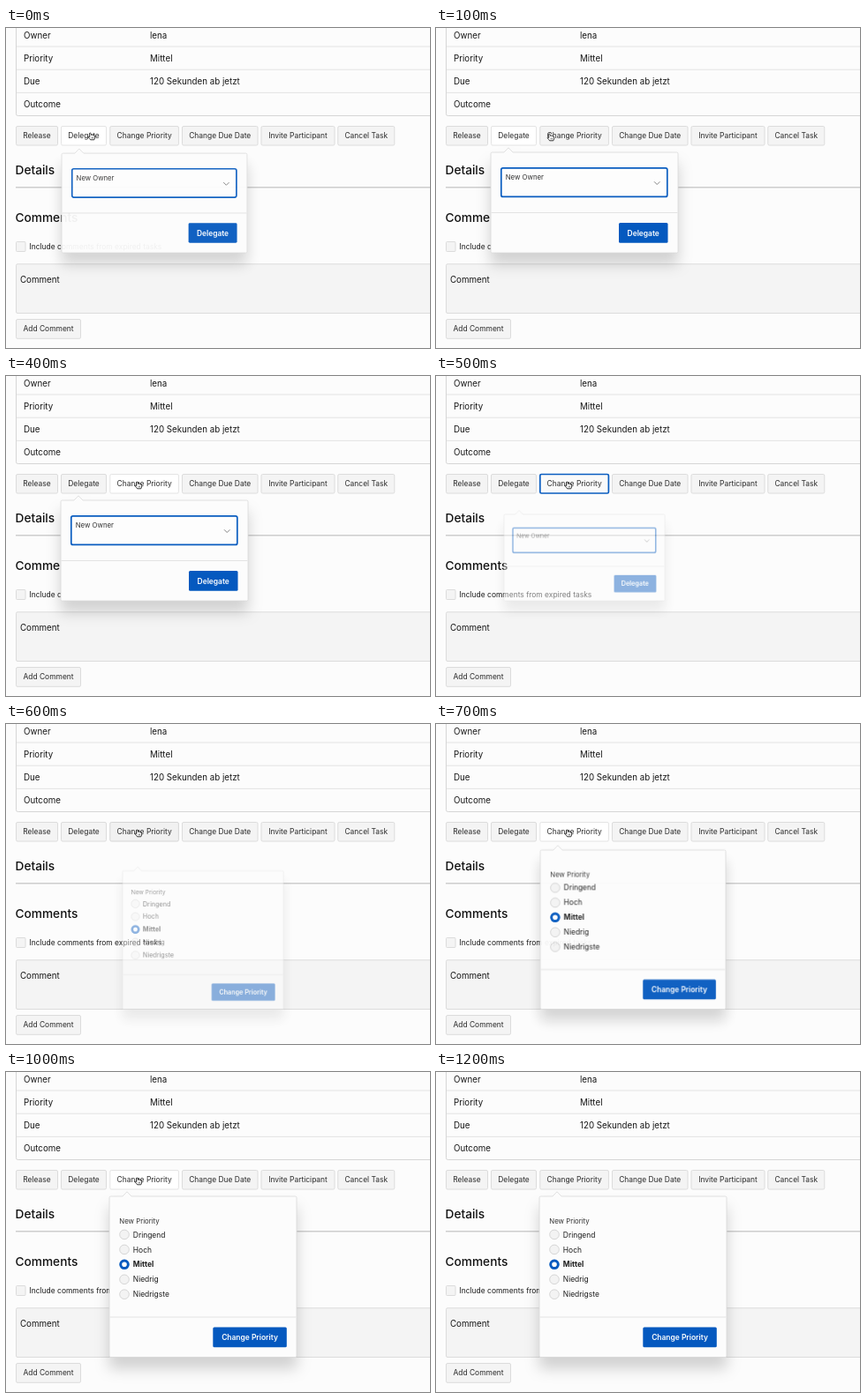
Write an HTML page that moves like this. It is 480 px wide and 363 px high and loops after 1.7 s.

```html
<!DOCTYPE html>
<html lang="de">
<head>
<meta charset="utf-8">
<title>Task actions</title>
<style>
  html, body { margin: 0; width: 100%; height: 100%; overflow: hidden; background: #fcfcfc; }
  svg { display: block; width: 100%; height: 100%; }
  text { font: 400 8.45px Inter, "Open Sans", sans-serif; fill: #1c1c1c; }

  .body text { font-size: 9.75px; fill: #161616; }
  .heading { font-size: 13.7px; font-weight: 500; fill: #111; }
  .small { font-size: 7.8px; fill: #333; }
  .line { stroke: #e3e3e3; }
  .box { fill: #f4f4f4; stroke: #dcdcdc; }
  .btn text { text-anchor: middle; fill: #2b2b2b; }
  .primary rect { fill: #0559bf; }
  .primary text { text-anchor: middle; font-weight: 600; fill: #fff; }
  .strong { font-weight: 700; }

  .panel { fill: #fcfcfc; stroke: #d9d9d9; stroke-width: .8; filter: drop-shadow(0 13px 8px rgba(0, 0, 0, .17)); }
  .field { fill: #fdfdfd; stroke: #0a5dc0; stroke-width: 1.7; }
  .radio { fill: #f3f3f3; stroke: #d6d6d6; }
  .radio.on { fill: #fff; stroke: #0559bf; stroke-width: 3; }

  #owner, #priority, #delegate, #change, #hand { animation: 1.7s step-end infinite; }
  #owner { transform-origin: 168px 255px; animation-name: owner; }
  #priority { transform-origin: 223px 323.5px; animation-name: priority; }
  #delegate { animation-name: delegate; }
  #change { animation-name: change; }
  #hand { animation-name: hand; }

  @keyframes owner {
    0% { opacity: .95; transform: scale(.99); }
    5.88% { opacity: 1; transform: none; }
    29.41% { opacity: .45; transform: scale(.86); }
    35.29%, 100% { opacity: 0; transform: scale(.86); }
  }
  @keyframes priority {
    0% { opacity: 0; transform: scale(.86); }
    35.29% { opacity: .45; transform: scale(.86); }
    41.17% { opacity: .95; transform: scale(.99); }
    47.05%, 100% { opacity: 1; transform: none; }
  }
  @keyframes delegate {
    0% { fill: #fff; stroke: #e4e4e4; }
    11.76%, 100% { fill: #f4f4f4; stroke: #dcdcdc; }
  }
  @keyframes change {
    0% { fill: #f4f4f4; stroke: #dcdcdc; stroke-width: 1; }
    11.76% { fill: #fff; stroke: #e4e4e4; stroke-width: 1; }
    29.41% { fill: #fafafa; stroke: #0a5dc0; stroke-width: 1.7; }
    35.29% { fill: #f1f1f1; stroke: #d6d6d6; stroke-width: 1; }
    41.17% { fill: #fff; stroke: #e4e4e4; stroke-width: 1; }
    70.58%, 100% { fill: #f4f4f4; stroke: #dcdcdc; stroke-width: 1; }
  }
  @keyframes hand {
    0% { transform: translate(97px, 123px); opacity: 1; }
    5.88% { transform: translate(130px, 124px); opacity: 1; }
    11.76% { transform: translate(146px, 124px); opacity: 1; }
    17.64% { transform: translate(150px, 124px); opacity: 1; }
    70.58%, 100% { transform: translate(150px, 124px); opacity: 0; }
  }
</style>
</head>
<body>
<svg viewBox="0 0 480 363" preserveAspectRatio="none">
  <!-- Task table -->
  <path d="M11.5 -2V97.5Q11.5 99.5 13.5 99.5H482" fill="none" stroke="#d6d6d6"/>
  <path class="line" d="M12 21H480M12 47.2H480M12 73.4H480"/>
  <g class="body">
    <text x="20" y="11.5">Owner</text><text x="163" y="11.5">lena</text>
    <text x="20" y="37.7">Priority</text><text x="163" y="37.7">Mittel</text>
    <text x="20" y="63.8">Due</text><text x="163" y="63.8">120 Sekunden ab jetzt</text>
    <text x="20" y="90">Outcome</text>
  </g>

  <!-- Actions -->
  <g class="btn">
    <rect class="box" x="11.5" y="111.5" width="47" height="21.5" rx="1.5"/><text x="35" y="125.3">Release</text>
    <rect class="box" id="delegate" x="62.5" y="111.5" width="51" height="21.5" rx="1.5"/><text x="88" y="125.3">Delegate</text>
    <rect class="box" id="change" x="117.8" y="111.5" width="77.6" height="21.5" rx="1.5"/><text x="156.6" y="125.3">Change Priority</text>
    <rect class="box" x="199.5" y="111.5" width="85.5" height="21.5" rx="1.5"/><text x="242.2" y="125.3">Change Due Date</text>
    <rect class="box" x="289" y="111.5" width="83" height="21.5" rx="1.5"/><text x="330.5" y="125.3">Invite Participant</text>
    <rect class="box" x="375.8" y="111.5" width="64" height="21.5" rx="1.5"/><text x="407.8" y="125.3">Cancel Task</text>
  </g>

  <text class="heading" x="10.5" y="166">Details</text>
  <path d="M11 180.8H480" stroke="#cecece" stroke-width="1.4"/>

  <!-- Comments -->
  <text class="heading" x="10.5" y="220">Comments</text>
  <rect class="box" x="11.5" y="242.5" width="10.5" height="11" rx="1"/>
  <text x="26.5" y="251">Include comments from expired tasks</text>
  <rect class="box" x="11.5" y="267.8" width="480" height="55.7" rx="1.5"/>
  <g class="body"><text x="16" y="288.5">Comment</text></g>
  <g class="btn">
    <rect class="box" x="11.5" y="330.5" width="73" height="21.8" rx="1.5"/><text x="48" y="344.3">Add Comment</text>
  </g>

  <g id="owner">
    <path class="panel" d="M63.5 141H77L82 135.8L87 141H272.5Q274 141 274 142.5V253.5Q274 255 272.5 255H63.5Q62 255 62 253.5V142.5Q62 141 63.5 141Z"/>
    <rect class="field" x="73.8" y="158.8" width="188" height="32.6" rx="2"/>
    <text class="small" x="78.7" y="171.8">New Owner</text>
    <path d="M247 174.3L250.2 177.5L253.4 174.3" fill="none" stroke="#777" stroke-width=".9"/>
    <path class="line" d="M62.5 209.5H273.5"/>
    <g class="primary">
      <rect x="207" y="221" width="55.5" height="22.7" rx="1.5"/><text x="234.7" y="235.5">Delegate</text>
    </g>
  </g>

  <g id="priority">
    <path class="panel" d="M118.5 141H132L137 135.8L142 141H327.5Q329 141 329 142.5V322Q329 323.5 327.5 323.5H118.5Q117 323.5 117 322V142.5Q117 141 118.5 141Z"/>
    <text class="small" x="128.3" y="171.8">New Priority</text>
    <circle class="radio" cx="134" cy="184.4" r="5.3"/><text x="143.8" y="187.5">Dringend</text>
    <circle class="radio" cx="134" cy="201.4" r="5.3"/><text x="143.8" y="204.5">Hoch</text>
    <circle class="radio on" cx="134" cy="218.3" r="4.3"/><text class="strong" x="143.8" y="221.4">Mittel</text>
    <circle class="radio" cx="134" cy="235.3" r="5.3"/><text x="143.8" y="238.4">Niedrig</text>
    <circle class="radio" cx="134" cy="252.2" r="5.3"/><text x="143.8" y="255.3">Niedrigste</text>
    <path class="line" d="M117.5 278H328.5"/>
    <g class="primary">
      <rect x="234.3" y="289.5" width="83.5" height="22.7" rx="1.5"/><text x="276" y="304">Change Priority</text>
    </g>
  </g>

  <g id="hand">
    <path d="M-2.4 -3.6Q-1.6 -4.4 -1 -3.4L-.4 -1.6Q.4 -2.3 1 -1.5Q1.8 -2 2.3 -1.1Q3.6 -1.3 3.7 .2Q3.8 2 2.8 3.8H-1.4Q-2.4 2.4 -3.8 .8Q-4 -.4 -2.2 .4Z"
      fill="#fff" stroke="#222" stroke-width=".9" stroke-linejoin="round"/>
    <path d="M0 .6V2.4M1.5 .6V2.4" stroke="#222" stroke-width=".6"/>
  </g>
</svg>
</body>
</html>
```
